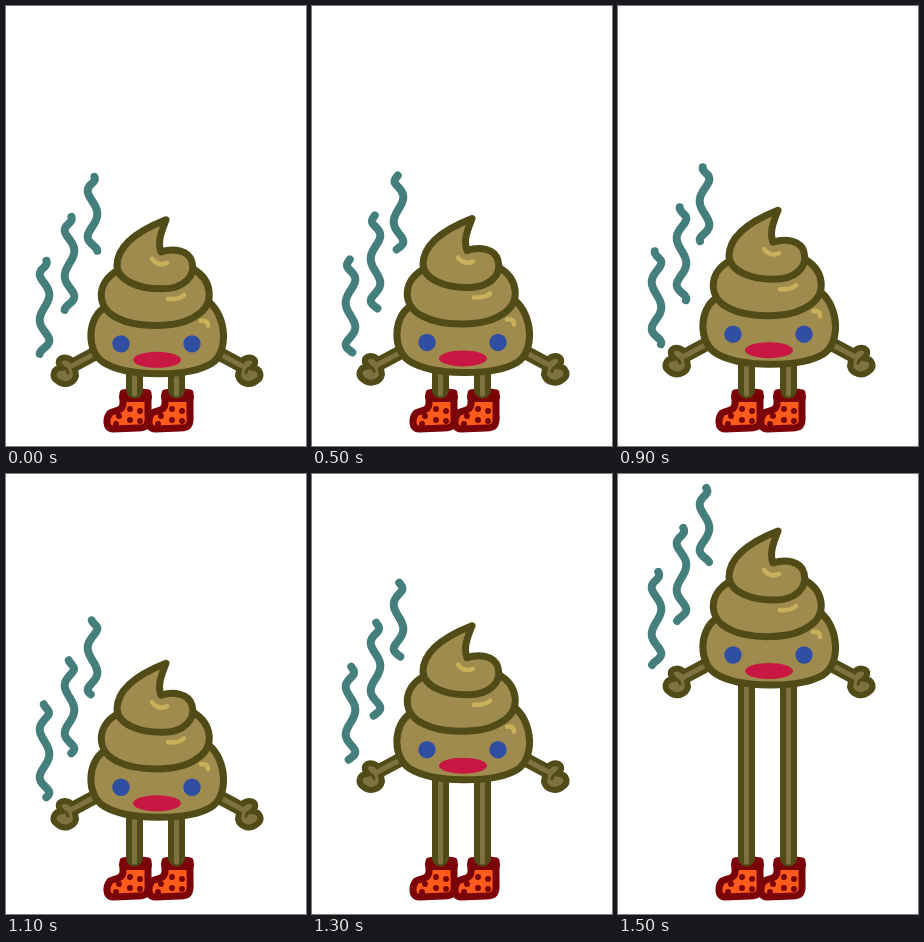
Write an HTML page that moves like this. It is 300 px wide and 440 px high and loops after 1.8 s.

```html
<!DOCTYPE html>
<html lang="en">
<head>
<meta charset="utf-8">
<title>Growing legs</title>
<style>
  html, body { margin: 0; height: 100%; overflow: hidden; background: #fff; }
  svg { display: block; width: 300px; height: 440px; }
  path, line { stroke-linecap: round; stroke-linejoin: round; }
  .dark { stroke: #504b17; }
  .skin { fill: #9f8b4e; stroke-width: 7; }
  .limb { fill: #7f7241; }
  .core { stroke: #7f7241; }
  .shine { fill: none; stroke: #c9b05b; stroke-width: 4.5; }
  .steam { fill: none; stroke: #447f7d; stroke-width: 8; }
</style>
</head>
<body>
<svg viewBox="0 0 300 440">
  <defs>
    <g id="boot" stroke="#7b0409">
      <path d="M117 387 Q129 384 142 387 L142 408 C143 420 140 422 132 422 L107 423 C99 423 100 412 104 407 C108 404 116 406 117 398 Z"
        fill="#ff5b1d" stroke-width="7"/>
      <path d="M118 391 H141" stroke-width="10"/>
      <path d="M124 403h0 M134 405h0 M113 410h0 M124 414h0 M134 415h0 M110 418h0" stroke-width="6"/>
    </g>
    <g id="arm">
      <line class="dark" x1="94" y1="345" x2="66" y2="360" stroke-width="14"/>
      <path class="dark limb" d="M68 358 C64 349 51 350 53 358 C54 360 55 361 56 362 C47 362 45 371 51 375 C58 381 68 378 70 370 Z" stroke-width="6"/>
      <path class="dark" d="M56 362 Q61 362 62 367" fill="none" stroke-width="3"/>
      <line class="core" x1="94" y1="345" x2="66" y2="360" stroke-width="5"/>
    </g>
  </defs>

  <use href="#boot"/>
  <use href="#boot" x="42"/>
  <g id="legs"></g>

  <g id="body">
    <g id="steam"></g>
    <use href="#arm"/>
    <use href="#arm" transform="translate(302 0) scale(-1 1)"/>
    <g class="dark skin">
      <path d="M98 302 C81 313 80 346 98 357 C121 371 181 372 205 358 C223 347 221 311 203 296 Z"/>
      <path d="M111 265 C90 277 90 302 111 312 C130 322 171 323 190 310 C210 298 206 274 187 263 Z"/>
      <path d="M160 214 C137 223 111 237 111 260 C112 275 133 283 155 283 C178 283.5 190 270 186 256 C183 244 167 242 155 246 C151 235 156 225 160 214 Z"/>
    </g>
    <path class="shine" d="M146 253 Q152 261 161 257 M162 293 Q173 294 178 289 M195 315 Q202 314 202 320"/>
    <g fill="#304fa3">
      <circle cx="115" cy="338" r="8.7"/>
      <circle cx="186" cy="338" r="8.7"/>
    </g>
    <ellipse cx="151" cy="354" rx="24" ry="8" fill="#c81743"/>
  </g>
</svg>
<script>
const STEP = 100, STEPS = 16, LOOP = 1800, RISE = 157;
const $ = id => document.getElementById(id);

function add(parent, tag, attrs) {
  const el = document.createElementNS('http://www.w3.org/2000/svg', tag);
  for (const key in attrs) el.setAttribute(key, attrs[key]);
  return parent.appendChild(el);
}

const strands = [
  { x: 38.5, top: 255, length: 93, bends: 5 },
  { x: 63.5, top: 211, length: 93, bends: 5 },
  { x: 86.5, top: 171, length: 74, bends: 4 }
];
for (const strand of strands) strand.path = add($('steam'), 'path', { class: 'steam' });

const legLines = [128.5, 170.5].flatMap(x => [['dark', 17, 384], ['core', 5, 388]].map(
  ([cls, width, y]) => add($('legs'), 'line', { class: cls, 'stroke-width': width, x1: x, x2: x, y2: y })));

// A travelling wave whose bends crowd together towards both ends.
function wave({ x, top, length, bends }, phase) {
  const points = Array.from({ length: 61 }, (_, i) => {
    const p = i / 60;
    const amplitude = 4.8 * Math.min(1, 0.4 + 4 * p);
    const px = x + amplitude * Math.cos(Math.PI * bends * p + phase);
    const py = top + length * (p - 0.06 * Math.sin(2 * Math.PI * p));
    return `${px.toFixed(2)} ${py.toFixed(2)}`;
  });
  return 'M' + points.join('L');
}

function draw(now) {
  const step = Math.min(STEPS - 1, Math.floor(now % LOOP / STEP));
  const rise = RISE * 2 ** (10 * (step / (STEPS - 1) - 1));

  $('body').setAttribute('transform', `translate(0 ${-rise})`);
  for (const line of legLines) line.setAttribute('y1', 355 - rise);
  for (const strand of strands) {
    strand.path.setAttribute('d', wave(strand, 2 * Math.PI * step / STEPS));
  }
}

const start = performance.now();
function tick() {
  draw(performance.now() - start);
  requestAnimationFrame(tick);
}
tick();
</script>
</body>
</html>
```
